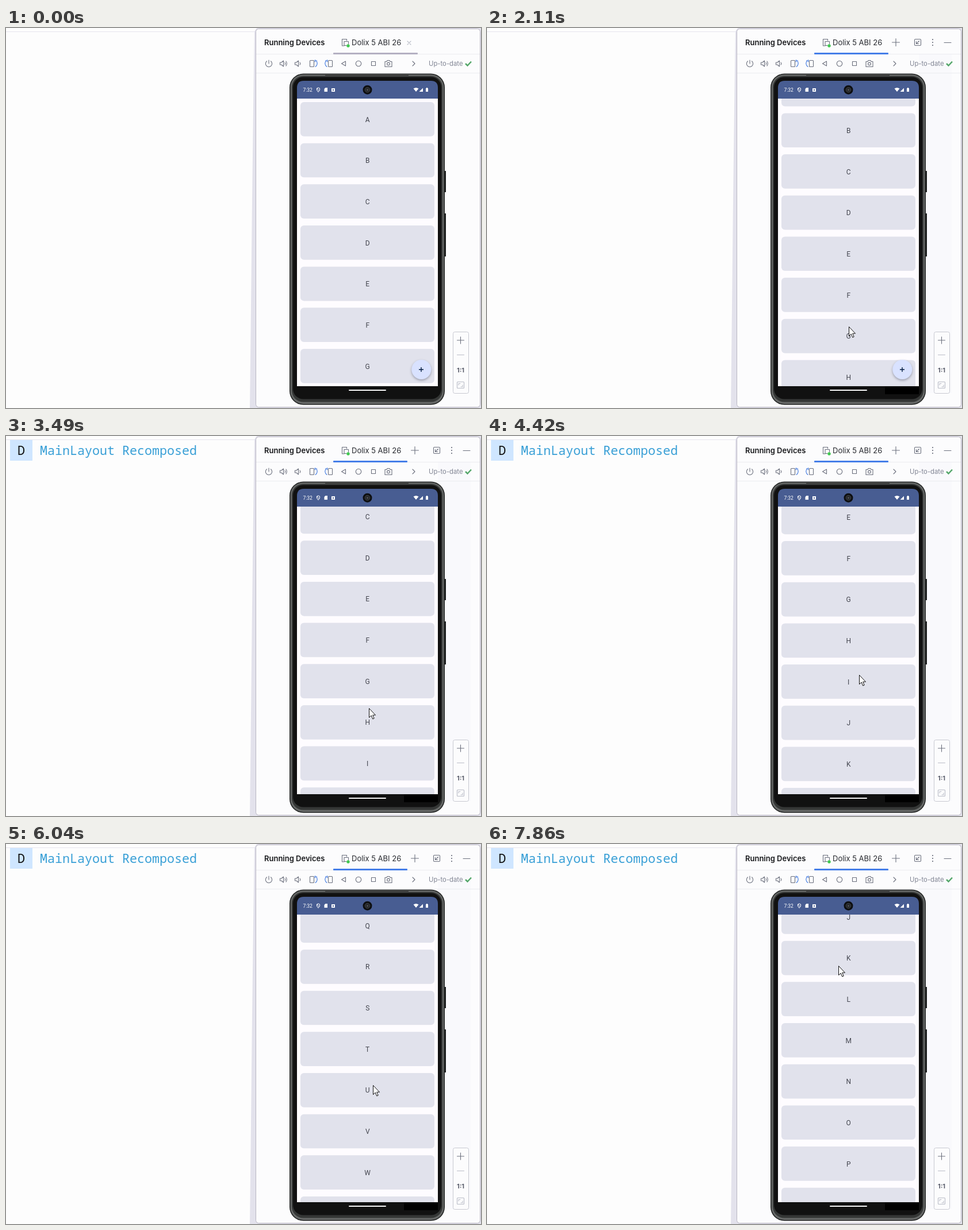
Animation of 826 by 662 pixels, one loop 8000 ms. Source, as an HTML page:

```html
<!DOCTYPE html>
<html lang="en">
<head>
<meta charset="utf-8">
<title>Scrolling list on an emulator</title>
<style>
html, body { margin: 0; width: 100%; height: 100%; overflow: hidden; background: #fdfdfd; }
svg { display: block; width: 826px; height: 662px; }
text { font-family: Inter, sans-serif; }
.icon { fill: none; stroke: #6c707e; stroke-width: 1.1; stroke-linecap: round; stroke-linejoin: round; }
.blue { stroke: #3f78e0; }
.light { stroke: #b9bcc7; }
.letter { font: 12px Roboto, sans-serif; fill: #44464f; text-anchor: middle; }
.clock { font: 8.5px Roboto, sans-serif; fill: #fff; }
.log { font: 21.67px "Noto Sans Mono", "DejaVu Sans Mono", monospace; }
#fab { filter: drop-shadow(0 2px 2px rgba(40, 45, 70, .38)); }
</style>
</head>
<body>
<svg viewBox="0 0 826 662" width="826" height="662">
  <clipPath id="viewport"><rect x="506" y="123" width="245" height="501"/></clipPath>

  <rect width="826" height="662" fill="#fdfdfd"/>
  <path d="M0 6.5H433" stroke="#e6e5ee"/>
  <path d="M432 6L436 0H826V662H424L425 580L428 300L430 140Z" fill="#e3e2ec"/>
  <g id="log">
    <rect x="7" y="7" width="39" height="36" fill="#cfe6ff"/>
    <text class="log" x="20" y="33" fill="#111">D</text>
    <text class="log" x="59" y="33" fill="#389fd6">MainLayout Recomposed</text>
  </g>

  <!-- Tool window -->
  <rect x="434.5" y="1.5" width="390" height="659" rx="5" fill="#fcfcfd" stroke="#b9b6c3"/>
  <rect id="tint" x="751" y="46" width="57" height="590" fill="#f9f9fc"/>
  <path d="M435 45.5H824M435 78.5H824" stroke="#ebecf0"/>
  <text x="449" y="30" font-size="13" font-weight="600" fill="#17181b">Running Devices</text>
  <path class="icon" d="M588 31H584.5V19.5H592.5V22M588 25.5V23.5H595.5V28M588 25.5V30.5H592"/>
  <circle cx="595" cy="31" r="2.7" fill="#40c850"/>
  <text x="601" y="30" font-size="13" fill="#26282e">Dolix 5 ABI 26</text>
  <rect id="underline" x="569" y="43" height="3" rx="1"/>
  <path id="close" class="icon light" d="M698 23L704 29M704 23L698 29"/>
  <g id="actions" class="icon">
    <path d="M704.5 25H717.5M711 18.5V31.5M795 25.5H807"/>
    <rect x="743.5" y="19.5" width="11" height="11" rx="1.5"/>
    <path d="M751.5 22.5L746.5 27.5M746.5 23.5V27.5H750.5"/>
    <path d="M775 20V20.1M775 25V25.1M775 30V30.1" stroke-width="2.2"/>
  </g>

  <!-- Toolbar -->
  <g class="icon">
    <path d="M457 56V62M453.5 57.8A5.6 5.6 0 1 0 460.5 57.8"/>
    <path id="speaker" d="M476.5 60H479L482.5 57V67L479 64H476.5ZM485 60Q486.5 62 485 64"/>
    <path d="M487 58Q489.5 62 487 66"/>
    <use href="#speaker" x="26"/>
    <g id="rotate">
      <rect x="528.5" y="56.5" width="7" height="11" rx="1"/>
      <path class="blue" d="M537 57H540.5M538 67.5Q543 64 540 57.5M537.5 55.5V59"/>
    </g>
    <use href="#rotate" transform="translate(1096 0) scale(-1 1)"/>
    <path d="M590.5 58V66L583.5 62Z"/>
    <circle cx="613" cy="62" r="4.7"/>
    <rect x="635.5" y="58.5" width="7" height="7"/>
    <path d="M659 58.5H662L663 56.5H667L668 58.5H671V67.5H659Z"/>
    <circle cx="665" cy="62.5" r="2.4"/>
    <path d="M707 58L711 62L707 66"/>
  </g>
  <text x="735" y="66" font-size="11.3" fill="#818594">Up-to-date</text>
  <path d="M799 62L802.5 65.5L809 58.5" fill="none" stroke="#55a76a" stroke-width="2.5"/>

  <!-- Zoom controls -->
  <rect x="777.5" y="529.5" width="27" height="107" rx="3" fill="#fcfcfd" stroke="#c7c8d0"/>
  <g class="icon">
    <path d="M784.5 544H796.5M790.5 538V550"/>
    <path class="light" d="M784.5 569.5H796.5M787 622V619.5H790M794 622V625H791"/>
    <rect class="light" x="784.5" y="616.5" width="12" height="11" rx="1"/>
  </g>
  <text x="790.5" y="600" font-size="11" font-weight="700" fill="#5a5d6b" text-anchor="middle">1:1</text>

  <!-- Phone -->
  <path d="M762 249H765V286H762ZM762 323H765V398H762Z" fill="#1b1d1c"/>
  <rect x="493" y="79.500" width="270" height="577" rx="24" fill="#1f2120"/>
  <rect x="494.5" y="81" width="267" height="574" rx="22.5" fill="#666867"/>
  <rect x="497" y="83.5" width="262" height="568" rx="20" fill="#353736"/>
  <rect x="499" y="85.5" width="258" height="561" rx="18" fill="#111"/>
  <path d="M555 82.5H700" stroke="#222"/>
  <path d="M506 123V104Q506 92 518 92H739Q751 92 751 104V123Z" fill="#485d92"/>
  <rect x="506" y="123" width="245" height="501" fill="#fefcff"/>
  <text class="clock" x="516.5" y="110.8">7:32</text>
  <g fill="#fff">
    <path d="M540.5 105L543 104L545.5 105V108L543 111.5L540.5 108ZM541 105L545 110" fill="none" stroke="#fff"/>
    <path d="M553.5 106L555.5 104H559V111H553.5ZM566 105H572V111H566Z"/>
    <path d="M708.5 105.5Q713 102.5 717.5 105.5L713 111ZM718.5 111L725 104.5V111ZM730 105H731V104H733V105H734V111H730Z"/>
  </g>
  <circle cx="569" cy="108" r="1.2" fill="#485d92"/>
  <circle cx="628.5" cy="107.7" r="8" fill="#0d0e10"/>
  <circle cx="628.5" cy="107.7" r="4.3" fill="#242629" stroke="#45474a"/>
  <circle cx="628.5" cy="107.7" r="1.5" fill="#505257"/>
  <rect id="patch" x="692" y="625" width="59" height="13" fill="#000"/>
  <rect x="596" y="630" width="65" height="2" rx="1" fill="#f4f4f4"/>

  <g clip-path="url(#viewport)">
    <g id="list"></g>
    <g id="fab">
      <circle cx="722.3" cy="595" r="17" fill="#d9e2ff"/>
      <path d="M718 595H726M722 591V599" stroke="#001a43" stroke-width="1.4"/>
    </g>
  </g>
  <path id="cursor" d="M.5 .5V16.5L4.2 13L6.7 19L9.2 18L6.7 12.2H11.5Z" fill="#fff" stroke="#111"/>
</svg>
<script>
const LOOP = 8000;
const PITCH = 71.67;       // distance between cards
const SLOP = 18;           // pointer travel before the list follows
const CAPTURE = 120;
const TRAVEL = 400;        // longest pointer move between gestures
const FLING = 600;         // longest glide after release

const el = id => document.getElementById(id);
const clamp = p => Math.min(1, Math.max(0, p));
const lerp = (a, b, p) => a + (b - a) * p;
const easeOut = p => 1 - (1 - p) ** 3;
const point = (x, y) => ({ x, y });

const gestures = [];
function swipe(press, duration, from, to, rest) {
  const base = gestures.length ? gestures[gestures.length - 1].rest : 0;
  gestures.push({ press, duration, release: press + duration, from, to, base, rest: rest ?? base });
}
const hover = (time, at) => swipe(time, 0, at, at);

hover(670, point(745, 640));
hover(970, point(636, 590));
swipe(1390, 840, point(623, 590), point(630, 508), 86);
swipe(3130, 480, point(615, 568), point(636, 443), 215);
swipe(4060, 480, point(627, 523), point(654, 380), 480);
swipe(4690, 180, point(642, 500), point(650, 350), 1221);
swipe(5050, 360, point(640, 520), point(646, 403), 1363);
swipe(5680, 240, point(643, 250), point(638, 420), 1113.5);
swipe(6540, 270, point(641, 232), point(622, 410), 855);
swipe(7200, 480, point(611, 212), point(597, 407), 677);
hover(7860, point(611, 212));

function pose(time) {
  const index = Math.max(0, gestures.filter(g => g.press <= time).length - 1);
  const g = gestures[index];
  const next = gestures[index + 1] ?? { press: Infinity, from: g.to };
  const t = g.press + Math.floor((time - g.press) / CAPTURE) * CAPTURE;
  const gap = next.press - g.release;

  const drag = clamp((t - g.press) / (g.duration || 1));
  const moved = (g.from.y - g.to.y) * drag;
  const pulled = Math.sign(moved) * Math.max(0, Math.abs(moved) - SLOP);
  const glide = easeOut(clamp((t - g.release) / Math.min(FLING, gap)));

  const span = Math.min(TRAVEL, gap);
  const travel = clamp(1 - (next.press - t) / span);
  const along = axis => Math.round(lerp(lerp(g.from[axis], g.to[axis], drag), next.from[axis], travel));
  return { x: along("x"), y: along("y"), scroll: lerp(g.base + pulled, g.rest, glide) };
}

el("list").innerHTML = [..."ABCDEFGHIJKLMNOPQRSTUVWXYZ"].map((letter, i) =>
  `<g transform="translate(512 ${129 + i * PITCH})">
    <rect width="233" height="59.7" rx="6" fill="#e1e2ec"/>
    <text class="letter" x="116.7" y="34.5">${letter}</text>
  </g>`).join("");

const show = (id, visible) => el(id).setAttribute("visibility", visible ? "visible" : "hidden");

function render(time) {
  const { x, y, scroll } = pose(time);
  const hovered = time >= 670, settled = time >= 820, focused = time >= 1270;
  const firstCardGone = scroll > PITCH;

  el("list").setAttribute("transform", `translate(0 ${-scroll})`);
  el("cursor").setAttribute("transform", `translate(${x} ${y})`);
  el("underline").setAttribute("width", hovered ? 129 : 147);
  el("underline").setAttribute("fill", focused ? "#457ee8" : "#b4b0c2");
  show("cursor", hovered);
  show("close", !hovered);
  show("actions", hovered);
  show("tint", settled);
  show("patch", settled);
  show("log", firstCardGone);
  show("fab", !firstCardGone);
}

const start = performance.now();
function loop() {
  render((performance.now() - start) % LOOP);
  requestAnimationFrame(loop);
}
loop();
</script>
</body>
</html>
```
